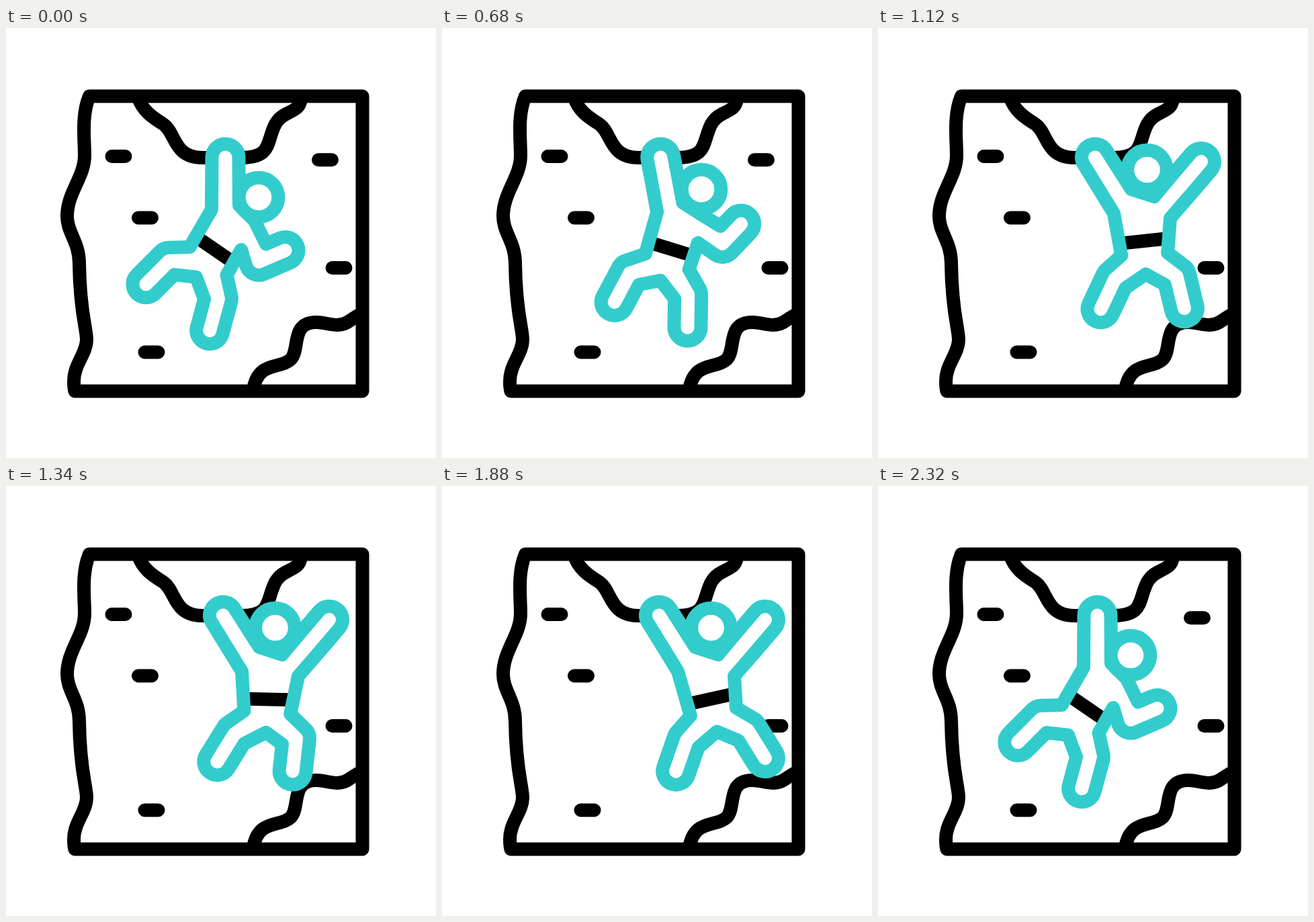
An HTML page that plays this animation: 640x640 px, repeating every 2.4 s.

```html
<!DOCTYPE html>
<html>
<head>
<meta charset="utf-8">
<title>Climber</title>
<style>
  html, body { margin: 0; height: 100%; overflow: hidden; background: #fff; }
  svg { display: block; width: 100vw; height: 100vh; fill: none; stroke: #000; stroke-width: 20; stroke-linejoin: round; }
</style>
</head>
<body>
<svg viewBox="0 0 640 640">
  <path d="M197 104C203 123 218 133 234 143C253 156 249 193 292 193H352C385 192 388 180 393 164S401 136 417 128S437 118 439 106"/>
  <path d="M368 538C375 495 409 508 424 493C438 478 423 438 462 438C478 438 492 447 508 438C516 433 522 428 530 425"/>
  <path d="M124 101.500H530.500V540.500H102.500Q101 535 101 526C101 500 120 485 120 464C120 446 110 425 109 350C109 318 91 305 91 280C91 245 117 222 117 190C117 165 112 130 124 101.500Z"/>
  <path stroke-linecap="round" d="M157.500 191h20M465 196.200h20M197 282.500h20M485.500 357h20M206.500 482.500h20"/>
  <path id="skin" fill="#fff" stroke="none"/>
  <path id="belt"/>
  <g stroke="#3cc">
    <path id="outline"/>
    <circle id="head" r="29.3" fill="#fff"/>
  </g>
</svg>
<script>
const LOOP = 2400, R = 20, REACH = 88, THIGH = 35.5, SHIN = 49;
const PIVOT = [326, 178];
const $ = id => document.getElementById(id);

// legs: pelvis tilt, left shin and right shin in degrees
const hang = {
  hold: [326.5, 192.5], shoulder: [306, 270], neckL: [347, 264], neckR: [370, 287],
  head: [376, 252], armpit: [350, 330], hand: [415.5, 331],
  pelvis: [301, 346.8], legs: [37, 135, 105], swing: [0]
};
const swung = { ...hang, swing: [1.17] };
const rise = {
  hold: [324, 192.5], shoulder: [334, 277], neckL: [369, 255], neckR: [401, 268],
  head: [395, 228], armpit: [410, 308], hand: [471.5, 251],
  pelvis: [368.5, 347], legs: [4, 105, 77], swing: [0]
};
const right = {
  hold: [323, 192.5], shoulder: [351, 276], neckL: [377, 240], neckR: [411, 251],
  head: [400.5, 211], armpit: [435, 283], hand: [481, 199],
  pelvis: [404, 336], legs: [-10, 109, 58], swing: [0]
};
const left = { ...right, pelvis: [388.5, 337], legs: [4, 122, 97] };

// [time, pose, passes through without stopping]
const keys = [
  [100, hang], [360, swung], [600, hang, true], [750, rise, true], [880, right],
  [1380, left], [1905, right], [2060, rise, true], [2320, hang]];

const mix = (a, b, f = 0.5) => a.map((v, i) => v + (b[i] - v) * f);
const shift = (p, n, f = 1) => p.map((v, i) => v + n[i] * f);

function rotate([x, y], degrees) {
  const a = degrees * Math.PI / 180, c = Math.cos(a), s = Math.sin(a);
  return [x * c - y * s, x * s + y * c];
}

function slope(k, part, i) {
  if (!keys[k][2]) return 0;
  const [t0, a] = keys[k - 1], [t1, b] = keys[k + 1];
  return (b[part][i] - a[part][i]) / (t1 - t0);
}

function poseAt(t) {
  const k = keys.findIndex(key => key[0] > t);
  if (k < 1) return hang;
  const [t0, a] = keys[k - 1], [t1, b] = keys[k];
  const d = t1 - t0, u = (t - t0) / d, s = u * u * (3 - 2 * u);
  const pose = {};
  for (const part in a) {
    pose[part] = mix(a[part], b[part], s).map((v, i) => v + d * u * (1 - u)
      * ((1 - u) * slope(k - 1, part, i) - u * slope(k, part, i)));
  }
  return pose;
}

const line = p => `L${p} `;
const arc = p => `A${R} ${R} 0 0 1 ${p} `;

// Normal to the left of a segment, as long as half the limb
function normal(a, b) {
  const x = b[0] - a[0], y = b[1] - a[1], f = R / Math.hypot(x, y);
  return [y * f, -x * f];
}

function tip(from, end) {
  const n = normal(from, end);
  return line(shift(end, n)) + arc(shift(end, n, -1));
}

// Both sides of a bent limb: rounded outside the bend, mitred inside
function limb(root, joint, end) {
  const m = normal(root, joint), n = normal(joint, end);
  const turn = m[0] * n[1] - m[1] * n[0];
  const miter = R * R / (R * R + m[0] * n[0] + m[1] * n[1]);
  const side = (s, p, q) => turn * s > 0
    ? line(shift(joint, p, s)) + arc(shift(joint, q, s))
    : line(shift(joint, shift(m, n), s * miter));
  return side(1, m, n) + tip(joint, end) + side(-1, n, m);
}

// The nearer the hand, the more the elbow bends
function arm(root, hand) {
  const slack = Math.max(0, REACH - Math.hypot(hand[0] - root[0], hand[1] - root[1]));
  return limb(root, shift(mix(root, hand), normal(root, hand), -slack * slack / 26 / R), hand);
}

function leg(root, thigh, shin) {
  const knee = shift(root, rotate([THIGH, 0], thigh));
  return limb(root, knee, shift(knee, rotate([SHIN, 0], shin)));
}

function draw(t) {
  const pose = poseAt(t), swing = pose.swing[0];
  const lean = p => shift(PIVOT, rotate(shift(p, PIVOT, -1), 5.5 * swing));
  const [hold, shoulder, neckL, neckR, head, armpit, hand, pelvis] =
    Object.values(pose).slice(0, 8).map(lean);
  const [tilt, shinL, shinR] = pose.legs.map(a => a + 14 * swing);
  const hip = (x, y) => shift(pelvis, rotate([x, y], tilt));
  const d = `M${shoulder} ` + tip(mix(shoulder, neckL), hold) + line(neckL) + line(neckR)
    + arm(mix(neckR, armpit), hand) + line(armpit) + line(hip(34.5, 0))
    + leg(hip(17, 15), tilt + 36, shinR) + line(hip(0, 30))
    + leg(hip(-17, 15), tilt + 146, shinL) + line(hip(-34.5, 0)) + 'Z';
  $('skin').setAttribute('d', d);
  $('outline').setAttribute('d', d);
  $('belt').setAttribute('d', `M${hip(-33, -18)} L${hip(33, -21)}`);
  $('head').setAttribute('cx', head[0]);
  $('head').setAttribute('cy', head[1]);
}

const start = performance.now();
function tick() {
  draw((performance.now() - start) % LOOP);
  requestAnimationFrame(tick);
}
tick();
</script>
</body>
</html>
```
